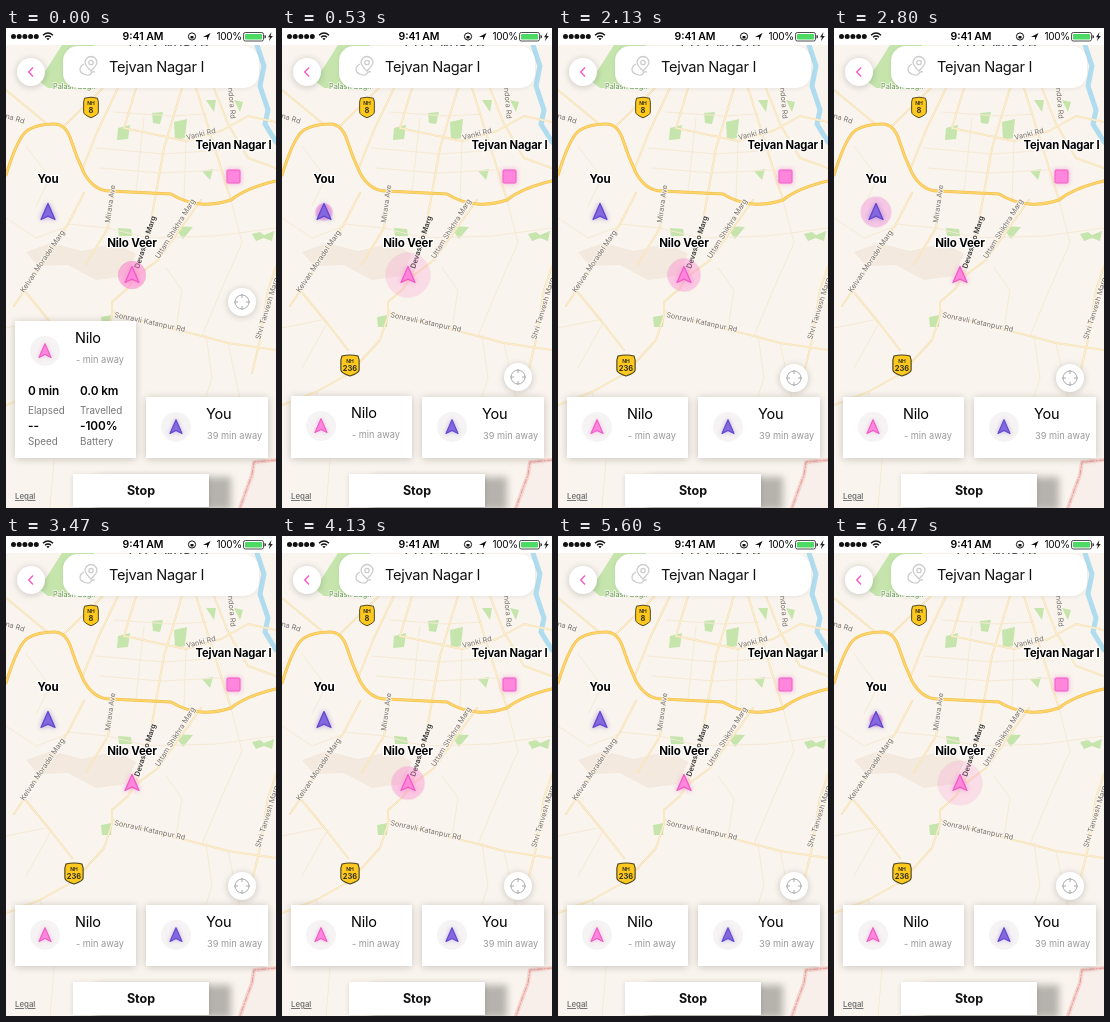
An HTML page for the animation above (6.54 s loop, 270x480 px).

```html
<!DOCTYPE html>
<html lang="en">
<head>
<meta charset="utf-8">
<title>Live location map</title>
<style>
  :root { --loop: 6540ms; }
  html, body { margin: 0; width: 100%; height: 100%; overflow: hidden; }
  body { position: relative; font-family: Inter, Roboto, sans-serif; color: #111; background: #f9f4ed; }
  svg { display: block; }
  .stage { position: absolute; left: 0; top: 0; width: 270px; height: 480px; overflow: hidden; }
  .map { position: absolute; inset: 0; }

  /* map */
  .park { fill: #c5e5ad; }
  .line { fill: none; stroke-linecap: round; stroke-linejoin: round; }
  .minor { stroke: #f6ead6; stroke-width: 1; }
  .local.case { stroke: #f5dfb5; stroke-width: 2; }
  .local.road { stroke: #fdf0cf; stroke-width: 1; }
  .main.case { stroke: #f0bd4d; stroke-width: 3; }
  .main.road { stroke: #fdd468; stroke-width: 2; }
  .street { font-size: 7.3px; fill: #77716b; stroke: #fbf6ef; stroke-width: 1.6px; paint-order: stroke; }
  .place { font-size: 11.5px; font-weight: 700; letter-spacing: -.15px; text-anchor: middle;
           stroke: #fff; stroke-width: 2.4px; paint-order: stroke; }
  .sign { text-anchor: middle; font-weight: 700; fill: #33301f; }
  .pink { fill: #ff86dc; stroke: #ee5cc4; }
  .violet { fill: #8468de; stroke: #6346cd; }
  .halo { stroke-width: 1; }
  .halo.a { fill: #ff78cf; stroke: #e868b4; animation: pulse-a var(--loop) infinite; }
  .halo.b { fill: #f283d8; stroke: #e56cc6; animation: pulse-b var(--loop) infinite; }

  /* interface */
  .status { position: absolute; inset: 0 0 auto; height: 17px; background: #fff; }
  .round { position: absolute; width: 28px; height: 28px; border-radius: 50%; background: #fff;
           box-shadow: 0 1px 7px #0003; }
  .title { position: absolute; left: 57px; top: 18px; width: 196px; height: 42px; border-radius: 15px;
           background: #fff; box-shadow: 0 1px 5px #0001; }
  .title span { position: absolute; left: 46px; top: 11px; font-size: 14.6px; line-height: 20px;
                letter-spacing: -.3px; white-space: nowrap; }
  .title svg { position: absolute; left: 15px; top: 9px; }
  .card { position: absolute; bottom: 50px; height: 61px; background: #fff; overflow: hidden;
          box-shadow: 0 1px 8px #0003; }
  .card.a { left: 9px; width: 121px; animation: card-a var(--loop) infinite; }
  .card.b { left: 140px; width: 122px; animation: card-b var(--loop) infinite; }
  .card svg { position: absolute; left: 0; top: 0; }
  .name { font-size: 14.5px; letter-spacing: -.2px; }
  .away { font-size: 9.2px; fill: #999; }
  .value { font-size: 11.8px; font-weight: 600; letter-spacing: -.1px; }
  .key { font-size: 9.8px; fill: #777; }
  .locate { left: 222px; top: 336px; animation: locate var(--loop) infinite; }
  .stop { position: absolute; left: 67px; top: 446px; width: 136px; height: 33px; background: #fff;
          font-size: 12.5px; font-weight: 700; line-height: 33px; text-align: center;
          box-shadow: 22px 3px 7px #0004, 0 1px 5px #0002; }
  .legal { position: absolute; left: 9px; top: 463px; font-size: 7.8px; line-height: 10px; font-weight: 600;
           color: #777; text-decoration: underline; }

  @keyframes card-a {
    0%, 3.06% { height: 137px; animation-timing-function: ease-in-out; }
    8.56%, 100% { height: 61px; }
  }
  @keyframes card-b {
    0%, 11.6% { height: 61px; animation-timing-function: ease-in-out; }
    16.2%, 22.5% { height: 137px; animation-timing-function: ease-in-out; }
    28%, 100% { height: 61px; }
  }
  @keyframes locate {
    0%, 3.06%, 16.2%, 22.5% { transform: translateY(-76px); animation-timing-function: ease-in-out; }
    8.56%, 11.6% { transform: none; animation-timing-function: ease-in-out; }
    28%, 100% { transform: none; }
  }
  /* each pulse grows for 1 s and restarts every 2 s */
  @keyframes pulse-a {
    0% { transform: scale(.61); opacity: .52; animation-timing-function: ease-out; }
    9.94%, 40.52%, 71.1% { transform: scale(1); opacity: .17; }
    11.2%, 25.22%, 41.8%, 55.8%, 72.4%, 86.38% { transform: scale(1); opacity: 0; animation-timing-function: step-end; }
    25.23%, 55.81%, 86.39% { transform: scale(.18); opacity: .75; animation-timing-function: ease-out; }
    100% { transform: scale(.98); opacity: .18; }
  }
  @keyframes pulse-b {
    0%, 5.8%, 22.4%, 36.38%, 53%, 66.96%, 83.6%, 97.54% { transform: scale(1); opacity: 0; animation-timing-function: step-end; }
    5.81%, 36.39%, 66.97%, 97.55% { transform: scale(.18); opacity: .75; animation-timing-function: ease-out; }
    21.1%, 51.68%, 82.26% { transform: scale(1); opacity: .17; }
    100% { transform: scale(.32); opacity: .65; }
  }
</style>
</head>
<body>
<div class="stage">
  <svg class="map" width="270" height="480" viewBox="0 0 270 480">
    <defs>
      <path id="arrow" d="M0-8.5 7 7.5 0 4.2-7 7.5Z" stroke-width="1.3" stroke-linejoin="round"/>
      <path id="shield" d="M-7-9Q0-11 7-9L8-5V5Q8 8 0 11Q-8 8-8 5V-5Z" fill="#fdc91f" stroke="#4b431f"/>
      <filter id="glow" x="-60%" y="-60%" width="220%" height="220%"><feGaussianBlur stdDeviation="2.4"/></filter>
      <path id="main" d="M0 147Q12 108 22 102T48 96Q60 96 65 112T78 145Q88 163 104 163L165 166Q180 175 195 176T225 172Q240 160 270 153"/>
      <path id="local" d="M150 165 142 210 130 246 122 260 106 274 106 288 98 312 78 334 68 345 34 364 0 377
        M106 284 150 297 192 307 222 315 270 322M246 345 254 312 262 262 270 238
        M8 278 62 196 78 165M18 262 45 295 66 322M108 160 102 200 80 236M195 172 152 232 128 250
        M76 142 92 102 112 60 125 17M0 62 40 95M97 60 58 98M118 100 130 60M150 165 158 120 176 60
        M118 100 180 113 215 103 242 88 270 94M190 60 205 108 225 172M208 60 222 96 242 130 270 140"/>
    </defs>

    <rect width="270" height="480" fill="#f9f4ed"/>
    <path d="M20 224 45 215 76 223 110 215 130 226 120 248 90 252 62 237 32 238Z" fill="#f3e9de"/>
    <path d="M270 432 248 434 246 447 240 463 234 480H270Z" fill="#f9efea"/>
    <path class="park" d="M33 53 56 17H88L74 60H42ZM112 100 124 97 122 111 111 112ZM168 94 181 91 179 110 169 112Z
      M146 85 157 84 154 96 147 95ZM112 200 125 201 126 208 113 208ZM168 198 187 199 177 211Z
      M95 289 106 287 105 299 96 299ZM200 72 210 72 208 84ZM228 72 237 74 234 84ZM196 143 207 141 204 152Z
      M246 206 254 204 258 207 268 203 266 213 258 210 250 213Z"/>
    <path class="line" d="M251 17 258 38 254 58 262 82 259 96 270 114" stroke="#b0dcf0" stroke-width="5"/>
    <path class="line minor" d="M0 190 30 210 62 198M62 196 102 200 142 210 210 208 270 200M20 118 44 150 30 178
      M225 172 236 215 216 260 196 308M90 120 158 126 215 122M94 140 155 145 215 142M108 84 165 88 200 86
      M138 90 130 163M180 113 178 172M160 240 176 262 170 300M200 307 206 350 190 400M222 315 236 380
      M0 300 40 292M45 295 20 340M34 364 50 410 44 480"/>
    <path class="line" d="M270 432 248 434 246 447 240 463 234 480" stroke="#f5d3ce" stroke-width="4"/>
    <path class="line" d="M270 432 248 434 246 447 240 463 234 480" stroke="#e59b95" stroke-dasharray="5 2 1 2"/>
    <use href="#local" class="line local case"/><use href="#local" class="line local road"/>
    <use href="#main" class="line main case"/><use href="#main" class="line main road"/>

    <g class="street">
      <text x="47" y="61" style="fill:#5c9b55">Palash Bagh</text>
      <text transform="translate(-1 90)rotate(17)">na Rd</text>
      <text transform="translate(18 265)rotate(-56)">Kelvan Moradel Marg</text>
      <text transform="translate(104 195)rotate(-82)">Mirava Ave</text>
      <text transform="translate(133 241)rotate(-72)" style="fill:#333;font-weight:600">Devashilo Marg</text>
      <text transform="translate(153 231)rotate(-58)">Uttam Shikhra Marg</text>
      <text transform="translate(181 112)rotate(-14)">Vanki Rd</text>
      <text transform="translate(222 60)rotate(85)">ndora Rd</text>
      <text transform="translate(108 289)rotate(12)">Sonravli Katanpur Rd</text>
      <text transform="translate(254 312)rotate(-73)">Shri Tanvesh Marg</text>
      <text x="123" y="20.5" style="font-size:11px;font-weight:600;letter-spacing:1.2px;fill:#555">CITY NORTH</text>
    </g>
    <g class="sign">
      <g transform="translate(85 79)"><use href="#shield" transform="scale(.92 .98)"/><text y="-2" font-size="5">NH</text><text y="6" font-size="7.5">8</text></g>
      <g transform="translate(68 337)"><use href="#shield" transform="scale(1.14 1)"/><text y="-2" font-size="5">NH</text><text y="6" font-size="7.5">236</text></g>
    </g>

    <g transform="translate(42 184)">
      <circle class="halo b" r="22.5"/>
      <use href="#arrow" class="violet" filter="url(#glow)" opacity=".55"/>
      <use href="#arrow" class="violet"/>
    </g>
    <g transform="translate(126 247)">
      <circle class="halo a" r="22.5"/>
      <use href="#arrow" class="pink" filter="url(#glow)" opacity=".55"/>
      <use href="#arrow" class="pink"/>
    </g>
    <rect x="221" y="142" width="13" height="13" class="pink" filter="url(#glow)" opacity=".6"/>
    <rect x="221" y="142" width="13" height="13" rx="1" class="pink"/>
    <g class="place">
      <text x="42" y="155">You</text>
      <text x="126" y="219">Nilo Veer</text>
      <text x="227.5" y="121" style="font-size:11.2px">Tejvan Nagar I</text>
    </g>
  </svg>

  <svg class="status" width="270" height="17" viewBox="0 0 270 17">
    <path d="M7.5 8.5h23" stroke="#111" stroke-width="5" stroke-linecap="round" stroke-dasharray="0 5.7"/>
    <g fill="none" stroke="#111" stroke-width="1.4">
      <path d="M37 7.2Q42 2.8 47 7.2M39 9.2Q42 6.6 45 9.2"/>
      <circle cx="186" cy="8.5" r="3.6" stroke-width="1"/>
    </g>
    <path d="M40.4 10.6Q42 9.2 43.6 10.6L42 12.3ZM184.5 8h3v2.6h-3ZM197 9 204.5 5 201 12.5V9Z" fill="#111"/>
    <text x="137" y="12.3" text-anchor="middle" font-size="10.5" font-weight="600">9:41 AM</text>
    <text x="210.5" y="12.2" font-size="10" letter-spacing="-.3">100%</text>
    <rect x="237.5" y="4.5" width="20" height="8.5" rx="1.8" fill="#fff" stroke="#222" stroke-width=".8"/>
    <rect x="239" y="6" width="17" height="5.5" rx=".7" fill="#4cd964"/>
    <path d="M258.5 7v3.5q1.5-.3 1.5-1.75T258.5 7ZM265.5 4 262 9.2h2L262.8 13.2 266.8 8h-2.2Z" fill="#222"/>
  </svg>

  <div class="round" style="left:11px;top:30px">
    <svg width="28" height="28"><path d="M16 9.5 11.8 14 16 18.5" fill="none" stroke="#f45fc8" stroke-width="1.5"/></svg>
  </div>
  <div class="title">
    <svg width="22" height="24" fill="none" stroke="#ccc" stroke-width="1.3">
      <path d="M13 16Q7 10 7 7.5a6 6 0 0 1 12 0Q19 10 13 16ZM6 9Q2 11 2 14.5T7 19.5 13 18.5 17 17"/><circle cx="13" cy="7.5" r="2.2"/>
    </svg>
    <span>Tejvan Nagar I</span>
  </div>

  <div class="round locate">
    <svg width="28" height="28" fill="none" stroke="#aaa"><circle cx="14" cy="14" r="7"/><path d="M14 6v4M14 18v4M6 14h4M18 14h4"/></svg>
  </div>

  <div class="card a">
    <svg width="122" height="137">
      <circle cx="30" cy="30" r="15" fill="#f5f3f3"/>
      <g transform="translate(30 30)scale(.86)"><use href="#arrow" class="pink" filter="url(#glow)" opacity=".4"/><use href="#arrow" class="pink"/></g>
      <text x="60" y="22" class="name">Nilo</text><text x="61" y="42" class="away">- min away</text>
      <g class="value"><text x="13" y="74">0 min</text><text x="65" y="74">0.0 km</text><text x="13" y="109">--</text><text x="65" y="109">-100%</text></g>
      <g class="key"><text x="13" y="93">Elapsed</text><text x="65" y="93">Travelled</text><text x="13" y="124">Speed</text><text x="65" y="124">Battery</text></g>
    </svg>
  </div>
  <div class="card b">
    <svg width="122" height="137">
      <circle cx="30" cy="30" r="15" fill="#f5f3f3"/>
      <g transform="translate(30 30)scale(.86)"><use href="#arrow" class="violet" filter="url(#glow)" opacity=".4"/><use href="#arrow" class="violet"/></g>
      <text x="60" y="22" class="name">You</text><text x="61" y="42" class="away">39 min away</text>
      <g class="value"><text x="13" y="74">0 min</text><text x="66" y="74">0.0 km</text><text x="13" y="109">--</text><text x="66" y="109">99%</text></g>
      <g class="key"><text x="13" y="93">Elapsed</text><text x="66" y="93">Travelled</text><text x="13" y="124">Speed</text><text x="66" y="124">Battery</text></g>
    </svg>
  </div>

  <div class="stop">Stop</div>
  <div class="legal">Legal</div>
</div>
</body>
</html>
```
